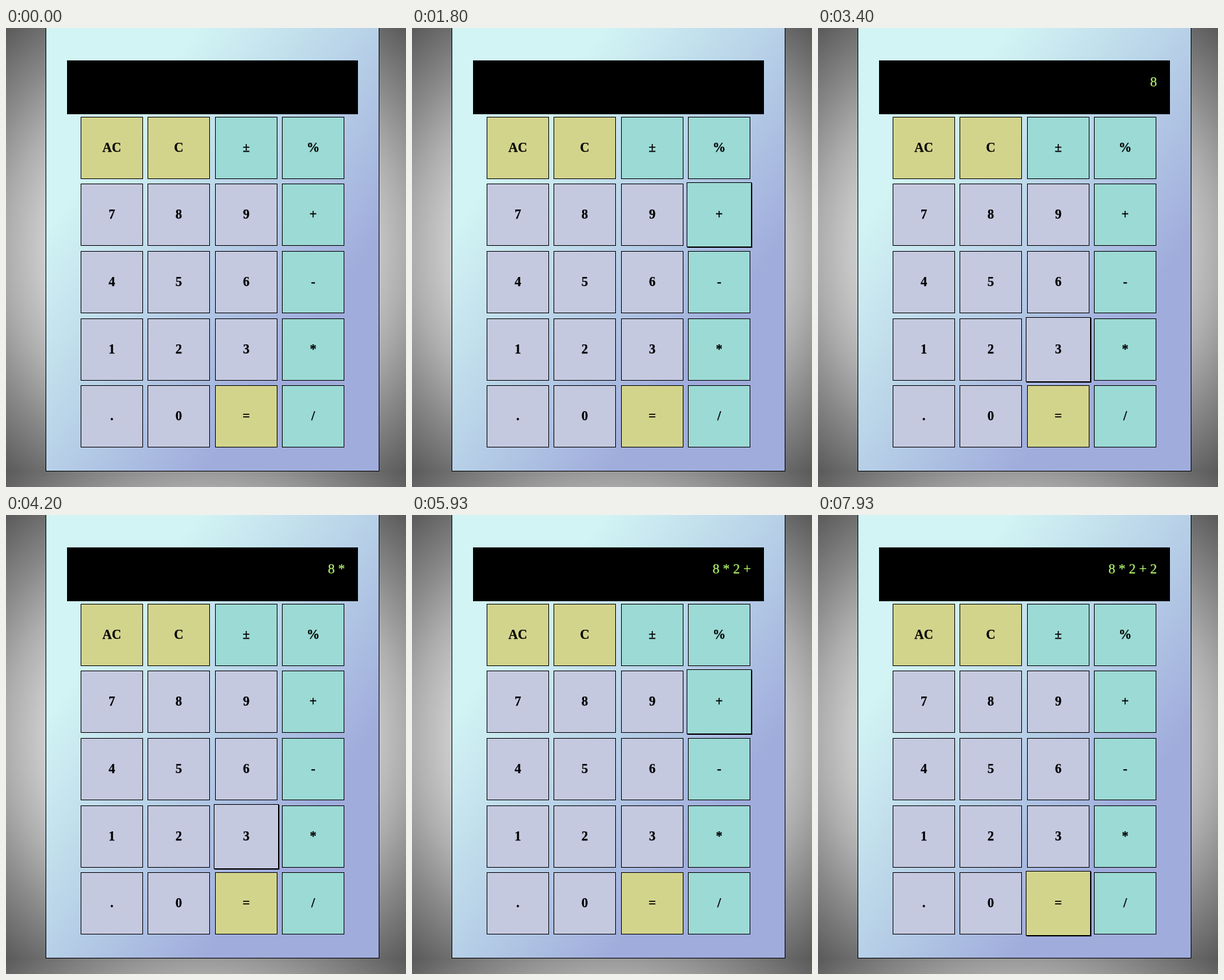
An HTML page that plays this animation: 616x708 px, repeating every 8000 ms.

```html
<!DOCTYPE html>
<html lang="en">
<head>
<meta charset="utf-8">
<title>Calculator</title>
<style>
  html, body {
    margin: 0;
    width: 100%;
    height: 100%;
    overflow: hidden;
  }
  body {
    position: relative;
    background: radial-gradient(circle at center, #cfcfcf 242px, #adadad 308px, #8a8a8a 368px, #505050 480px) 0 0 / 616px 684px;
    font-family: "Liberation Serif", "Times New Roman", Times, serif;
    -webkit-text-stroke: 0.25px;
  }
  .case, .display, .key {
    position: absolute;
    box-sizing: border-box;
  }
  .case {
    left: 61px;
    top: -4px;
    width: 514px;
    height: 688px;
    border: 1px solid #000;
    background: linear-gradient(to bottom right, #d2f4f4 23%, #b7d0e7 50%, #a0acdc 74%);
  }
  .display {
    left: 94px;
    top: 50px;
    width: 448px;
    height: 83px;
    padding-right: 20px;
    background: #000;
    color: #b3f56d;
    font-size: 21px;
    line-height: 66px;
    text-align: right;
  }
  .key {
    width: 96px;
    height: 96px;
    border: 1px solid #000;
    background: #c5c9e0;
    color: #000;
    font-size: 20px;
    font-weight: bold;
    line-height: 92px;
    text-align: center;
  }
  .operator { background: #9cdad5; }
  .command { background: #d3d48c; }
  .hover {
    width: 100px;
    height: 100px;
    margin: -2px;
    line-height: 96px;
    box-shadow: 1px 1px #000;
  }
</style>
</head>
<body>
<div class="case"></div>
<div class="display"></div>
<script>
  const LOOP = 8000;
  const labels = ["AC", "C", "±", "%", "7", "8", "9", "+", "4", "5", "6", "-", "1", "2", "3", "*", ".", "0", "=", "/"];

  // Each entry holds from its time (ms) until the next one.
  const hovers = [
    [0, ""], [1200, "+"], [2130, "9"], [2330, "8"],
    [3070, "5"], [3200, "6"], [3330, "3"], [3470, "*"],
    [4130, "3"], [4330, "2"], [5070, "3"], [5270, "6"], [5470, "+"],
    [6200, "6"], [6330, "5"], [6400, "2"], [7330, "3"], [7530, "="]
  ];
  const readouts = [
    [0, ""], [2600, "8"], [3800, "8 *"],
    [4730, "8 * 2"], [5800, "8 * 2 +"], [6930, "8 * 2 + 2"]
  ];

  const display = document.querySelector(".display");
  const keys = labels.map((label, i) => {
    const key = document.createElement("div");
    const kind = ["AC", "C", "="].includes(label) ? "command"
      : "±%+-*/".includes(label) ? "operator" : "";
    key.className = `key ${kind}`;
    key.textContent = label;
    key.style.left = `${Math.round(114.8 + 103.5 * (i % 4))}px`;
    key.style.top = `${Math.round(136.8 + 103.6 * Math.floor(i / 4))}px`;
    document.body.append(key);
    return key;
  });

  const valueAt = (track, time) => track.findLast(([start]) => start <= time)[1];

  function render(time) {
    const hovered = valueAt(hovers, time);
    keys.forEach(key => key.classList.toggle("hover", key.textContent === hovered));
    display.textContent = valueAt(readouts, time);
  }

  const origin = performance.now();
  function tick() {
    render((performance.now() - origin) % LOOP);
    requestAnimationFrame(tick);
  }
  tick();
</script>
</body>
</html>
```
